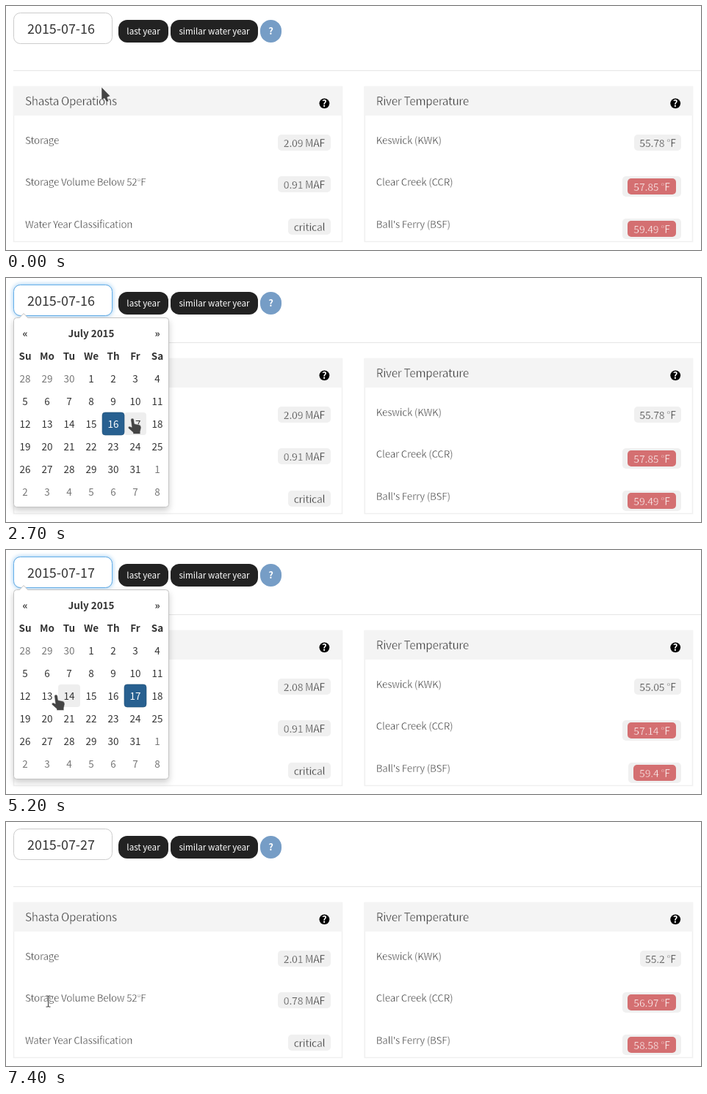
Recreate the animation shown at these times as an HTML page. Size 946 by 334 pixels, loop 8000 ms.

```html
<!DOCTYPE html>
<html lang="en">
<head>
<meta charset="utf-8">
<title>River dashboard</title>
<style>
  html, body { margin: 0; width: 100%; height: 100%; overflow: hidden; background: #fff; }
  svg { display: block; width: 946px; height: 334px; }
  text { font-family: "Noto Sans CJK JP", "Noto Sans CJK SC", "Noto Sans CJK", "Noto Sans", sans-serif; fill: #333; white-space: pre; }
  #glow { filter: drop-shadow(0 0 3px rgba(102, 175, 233, .75)); }
  #box { filter: drop-shadow(0 4px 4px rgba(0, 0, 0, .2)); }
  .thin { letter-spacing: -.018em; stroke-width: .42; stroke-linejoin: round; }
</style>
</head>
<body>
<svg id="stage" viewBox="0 0 946 334" xmlns="http://www.w3.org/2000/svg"></svg>
<script>
const LOOP = 8000, STEP = 100;
const NS = "http://www.w3.org/2000/svg";
const stage = document.getElementById("stage");
const EM = 1 / 1.117;

function el(parent, tag, attrs) {
  const node = document.createElementNS(NS, tag);
  for (const key in attrs) node.setAttribute(key, attrs[key]);
  parent.appendChild(node);
  return node;
}
function rect(parent, x, y, width, height, rx, fill, extra) {
  return el(parent, "rect", { x, y, width, height, rx, fill, ...extra });
}
// A text with "thin" gets a hairline in its background colour, which slims it to a light weight.
function label(parent, str, x, y, size, { weight = 400, fill = "#333", anchor = "start", thin } = {}) {
  const node = el(parent, "text", {
    x, y, "font-size": (size * EM).toFixed(2), "font-weight": weight, "text-anchor": anchor
  });
  node.style.fill = fill;
  if (thin) {
    node.setAttribute("class", "thin");
    node.setAttribute("stroke", thin);
  }
  node.textContent = str;
  return node;
}
const group = parent => el(parent, "g", {});
const show = (node, on) => node.setAttribute("visibility", on ? "visible" : "hidden");

// Top bar
const white = { fill: "#fff", anchor: "middle" };
rect(stage, 10.5, 9.5, 134, 42, 9, "#fff", { stroke: "#ccc" });
const glow = rect(stage, 10.5, 9.5, 134, 42, 9, "#fff", { id: "glow", stroke: "#66afe9" });
const dateText = label(stage, "", 29, 38, 20);
rect(stage, 153, 19, 68, 31, 12, "#222");
label(stage, "last year", 187, 39, 13, white);
rect(stage, 224, 19, 119, 31, 12, "#222");
label(stage, "similar water year", 283.5, 39, 13, white);
rect(stage, 346, 19, 29, 31, 14.5, "#769dc6");
label(stage, "?", 360.5, 39.3, 14.5, { ...white, weight: 700 });
rect(stage, 10, 88, 936, 1, 0, "#e6e6e6");

// Panels
function panel(x, width, title, rows) {
  rect(stage, x + .5, 110.5, width - 1, 212, 0, "#fff", { stroke: "#f0f0f0", "stroke-width": 1.6 });
  rect(stage, x, 110, width, 40, 0, "#f4f4f4");
  label(stage, title, x + 16, 136, 17, { thin: "#f4f4f4" });
  el(stage, "circle", { cx: x + 423.4, cy: 133.3, r: 6.9, fill: "#000" });
  label(stage, "?", x + 423.4, 138.1, 14.5, { ...white, weight: 700 });
  rows.forEach((row, i) => label(stage, row, x + 16, [189, 246, 304][i], 15, { thin: "#fff" }));
}
panel(10, 448, "Shasta Operations", ["Storage", "Storage Volume Below 52°F", "Water Year Classification"]);
panel(487.8, 447.2, "River Temperature", ["Keswick (KWK)", "Clear Creek (CCR)", "Ball's Ferry (BSF)"]);

// Value badges: [right edge, top, red]
const badges = [
  [442, 176, 0], [442, 233, 0], [442, 291, 0],
  [919, 176, 0], [919, 233, 1], [919, 291, 1]
].map(([right, top, red]) => {
  const back = rect(stage, 0, top, 10, red ? 28 : 22, 5, "#f0f0f0");
  const body = group(stage);
  const chip = red && rect(body, 0, top + 3, 10, 22, 5, "#d46f71");
  const text = label(body, "", 0, top + (red ? 20 : 17), 15.75,
    red ? { ...white, thin: "#d46f71" } : { anchor: "middle", thin: "#f0f0f0" });
  return { right, red, back, body, chip, text };
});
const READINGS = [
  [0, ["2.09 MAF", "0.91 MAF", "critical", "55.78 °F", "57.85 °F", "59.49 °F"]],
  [3700, ["2.08 MAF", "0.91 MAF", "critical", "55.05 °F", "57.14 °F", "59.4 °F"]],
  [7300, ["2.01 MAF", "0.78 MAF", "critical", "55.2 °F", "56.97 °F", "58.58 °F"]]
];
function setBadge(badge, str) {
  const { right, red, back, chip, text } = badge;
  const inner = str.endsWith("MAF") ? 72 : str === "critical" ? 58 : 8 * str.length + (red ? 2 : 0);
  const outer = inner + (red ? 14 : 0);
  back.setAttribute("x", right - outer);
  back.setAttribute("width", outer);
  if (chip) {
    chip.setAttribute("x", right - 7 - inner);
    chip.setAttribute("width", inner);
  }
  text.setAttribute("x", right - outer / 2);
  text.textContent = str;
}

// Calendar
const LEFT = 11, CELL = 30, ROW = 31, TOP = 122;
const cal = group(stage);
rect(cal, 10.5, 54.5, 211, 259, 4, "#fff", { id: "box", stroke: "#c4c4c4" });
el(cal, "path", { d: "M17 55L24 48L31 55Z", fill: "#ccc" });
el(cal, "path", { d: "M18 55.5L24 49.2L30 55.5Z", fill: "#fff" });
const hoverBox = rect(cal, 0, 0, CELL, ROW, 4, "#eee");
const picked = rect(cal, 0, TOP + 2 * ROW, CELL, ROW, 4, "#286090", { stroke: "#204d74", "stroke-width": .6 });
const bold = { weight: 700, anchor: "middle" };
label(cal, "«", 26, 81, 15, bold);
label(cal, "July 2015", 116, 81, 15, bold);
label(cal, "»", 206, 81, 15, bold);
["Su", "Mo", "Tu", "We", "Th", "Fr", "Sa"].forEach((d, i) => label(cal, d, 26 + i * CELL, 112, 15, bold));
const days = Array.from({ length: 42 }, (_, i) => {
  const n = i - 2;
  const other = n < 1 || n > 31;
  const str = n < 1 ? n + 30 : n > 31 ? n - 31 : n;
  const node = label(cal, str, 26 + (i % 7) * CELL, 143 + Math.floor(i / 7) * ROW, 15, { anchor: "middle" });
  return { n, node, fill: other ? "#777" : "#333" };
});

function setHover(x, y, on) {
  const col = Math.floor((x + 4 - LEFT) / CELL), row = Math.floor((y - TOP) / ROW);
  const title = y >= 60 && y < 91;
  show(hoverBox, on && (title || row >= 0));
  const place = title ? [41, 60, 150] : [LEFT + col * CELL, TOP + row * ROW, CELL];
  ["x", "y", "width"].forEach((key, i) => hoverBox.setAttribute(key, place[i]));
}

// Pointers
const pointers = { arrow: group(stage), beam: group(stage), hand: group(stage) };
const edge = { fill: "#444", stroke: "#fff", "stroke-width": .7, "stroke-opacity": .7 };
el(pointers.arrow, "path", { d: "M0 0V18L4 15.4L7 20.4L9.6 19.2L7.8 14L11.8 12.2Z", ...edge });
el(pointers.hand, "path", {
  d: "M-2.2 2Q-2 0 0 0Q2 0 2.2 2L3 7.6L9 8.8Q12 9.6 12 13L10.8 18V21.5H1V19.5L-5.6 13.6Q-6.2 10.6 -3 11.2L-.8 12.4Z", ...edge
});
const beamPath = "M-3 -7.5H-1L0 -6.8L1 -7.5H3M0 -7V7M-3 7.5H-1L0 6.8L1 7.5H3";
el(pointers.beam, "path", { d: beamPath, fill: "none", stroke: "#fff", "stroke-width": 2.4, "stroke-opacity": .7 });
el(pointers.beam, "path", { d: beamPath, fill: "none", stroke: "#444", "stroke-width": 1.1 });

// [time, pointer, x, y]
const PATH = [
  [0, "arrow", 130, 111], [400, "arrow", 130, 111], [500, "arrow", 129.5, 110], [600, "arrow", 129.5, 110],
  [900, "arrow", 130, 75], [1000, "beam", 129, 50], [1200, "beam", 129, 42], [1800, "beam", 129, 42],
  [1900, "beam", 131, 27], [2000, "hand", 135, 76], [2200, "hand", 146, 142], [2700, "hand", 172, 192],
  [2800, "arrow", 171, 188], [3200, "arrow", 149, 112], [3400, "arrow", 135, 75], [3500, "beam", 127, 48],
  [3600, "beam", 120, 34], [4000, "beam", 113, 25], [4700, "beam", 113, 25], [4800, "hand", 110, 76],
  [5200, "hand", 68, 198], [5400, "hand", 46, 230], [5600, "hand", 43, 254], [5700, "hand", 43, 254],
  [5800, "beam", 45, 253], [6100, "beam", 50, 248], [6400, "beam", 50, 248], [6500, "beam", 53.5, 245.5],
  [6600, "beam", 57.5, 245.5], [LOOP, "beam", 57.5, 245.5]
];
const DATES = [[0, "2015-07-16"], [2800, "2015-07-17"], [5800, "2015-07-27"]];
const OPEN = [[0, 0], [1600, 1], [2800, 0], [4600, 1], [5800, 0]];
const FOCUS = [[0, 0], [1600, .6], [1700, 1], [2800, .4], [2900, 0], [4600, .6], [4700, 1], [5800, .4], [5900, 0]];
const FADE = [[0, 1], [3400, .8], [3500, .5], [3600, .3], [3700, 1], [6600, .75], [6800, .45], [6900, .3], [7300, 1]];

const at = (table, t) => table.reduce((val, row) => row[0] <= t ? row[1] : val, table[0][1]);

function pointerAt(t) {
  const i = PATH.findIndex((key, k) => k + 1 === PATH.length - 1 || PATH[k + 1][0] > t);
  const [t0, kind, x0, y0] = PATH[i], [t1, , x1, y1] = PATH[i + 1];
  const p = (t - t0) / (t1 - t0);
  return [kind, x0 + (x1 - x0) * p, y0 + (y1 - y0) * p];
}

let last = -1;
function draw(t) {
  if (t === last) return;
  last = t;
  const date = at(DATES, t), day = +date.slice(-2), open = at(OPEN, t);
  dateText.textContent = date;
  glow.setAttribute("opacity", at(FOCUS, t));

  const [kind, x, y] = pointerAt(t);
  for (const key in pointers) show(pointers[key], key === kind);
  pointers[kind].setAttribute("transform", `translate(${x.toFixed(1)} ${y.toFixed(1)})`);

  cal.style.display = open ? "" : "none";
  setHover(x, y, open && kind === "hand");
  picked.setAttribute("x", LEFT + (day + 2) % 7 * CELL);
  for (const { n, node, fill } of days) node.style.fill = n === day ? "#fff" : fill;

  const values = at(READINGS, t), fade = at(FADE, t);
  badges.forEach((badge, i) => {
    setBadge(badge, values[i]);
    badge.body.setAttribute("opacity", fade);
  });
}

const start = performance.now();
function tick(now) {
  const t = Math.max(0, now - start) % LOOP;
  draw(Math.floor(t / STEP) * STEP);
  requestAnimationFrame(tick);
}
draw(0);
requestAnimationFrame(tick);
</script>
</body>
</html>
```
